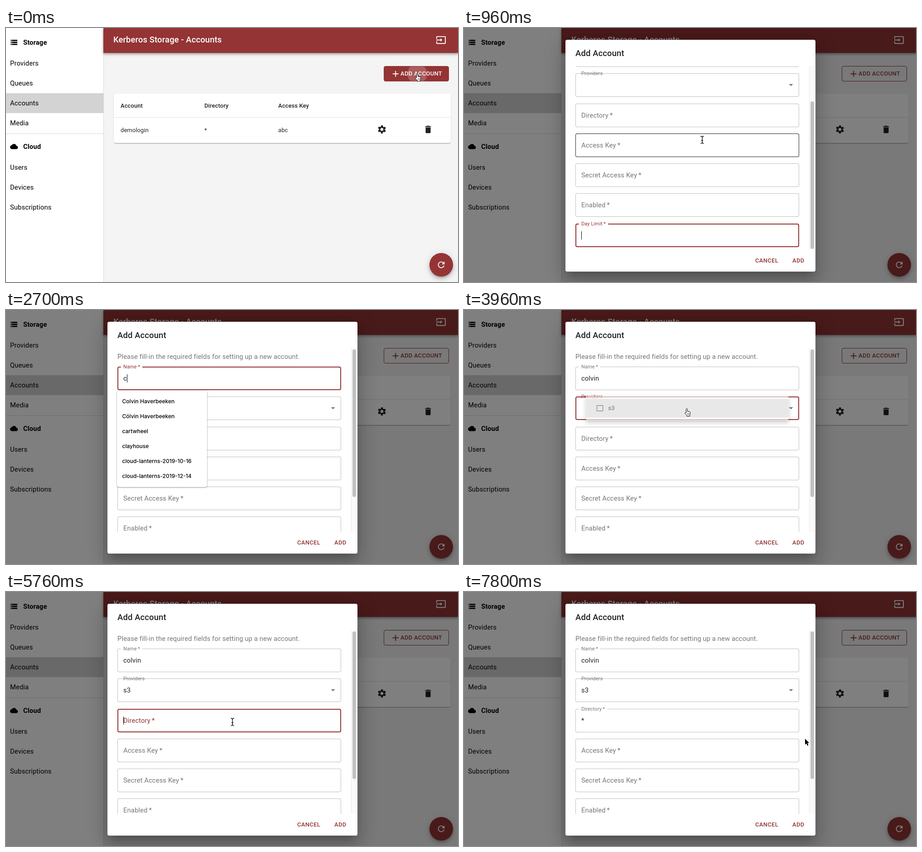
An HTML page that plays this animation: 998x561 px, repeating every 8 s.

```html
<!DOCTYPE html>
<html lang="en">
<head>
<meta charset="utf-8">
<title>Add Account</title>
<style>
  :root { --red: #943434; --ink: rgba(0,0,0,.87); --soft: rgba(0,0,0,.54); }
  html, body { margin: 0; width: 100%; height: 100%; overflow: hidden; }
  #stage { position: relative; width: 998px; height: 561px; overflow: hidden; background: #f4f4f4;
    font: 400 14.72px/20px Roboto, sans-serif; color: var(--ink); }
  #stage div, .t, .i { position: absolute; }
  .t { left: calc(var(--x) * 1px); top: calc(var(--y) * 1px - 10px); white-space: nowrap; letter-spacing: .009em; }
  .i { width: calc(var(--s) * 1px); height: calc(var(--s) * 1px); fill: currentColor;
    left: calc((var(--x) - var(--s) / 2) * 1px); top: calc((var(--y) - var(--s) / 2) * 1px); }
  .h6 { font-size: 18.4px; font-weight: 500; letter-spacing: .0075em; }
  .btn { font-size: 12.88px; font-weight: 500; letter-spacing: .02857em; }
  .cell { font-size: 12.88px; letter-spacing: .0107em; }
  .m { font-weight: 500; }
  .b { font-weight: 700; }
  .red { color: var(--red); }

  #side { left: 0; top: 0; width: 215px; height: 561px; background: #fff; border-right: 1px solid #dadada; color: #000; }
  #picked { top: 144px; width: 215px; height: 44px; background: #d3d3d3; }
  #rule { top: 233px; width: 215px; height: 1px; background: #d8d8d8; }
  #bar { left: 215px; top: 0; width: 783px; height: 55px; background: var(--red);
    box-shadow: 0 2px 4px rgba(0,0,0,.2), 0 4px 5px rgba(0,0,0,.14), 0 1px 9px rgba(0,0,0,.12); }
  #card { left: 238px; top: 145px; width: 744px; height: 109px; border-radius: 4px; background: #fff;
    box-shadow: 0 2px 1px -1px rgba(0,0,0,.2), 0 1px 1px rgba(0,0,0,.14), 0 1px 3px rgba(0,0,0,.12); }
  #card div { top: 52px; width: 744px; height: 1px; background: #e0e0e0; }
  #add { left: 834px; top: 84px; width: 144px; height: 34px; border-radius: 4px; overflow: hidden;
    box-sizing: border-box; border: 1px solid var(--red); }
  #ripple { left: 51px; top: -6px; width: 44px; height: 44px; border-radius: 50%; background: rgba(255,255,255,.2); }
  #fab { left: 935px; top: 497px; width: 51.5px; height: 51.5px; border-radius: 50%; background: var(--red);
    box-shadow: 0 3px 5px -1px rgba(0,0,0,.2), 0 6px 10px rgba(0,0,0,.14), 0 1px 18px rgba(0,0,0,.12); }

  #shade, #modal { inset: 0; }
  #shade { background: rgba(0,0,0,.5); }
  #paper { left: 224px; top: 26px; width: 551.5px; height: 512px; border-radius: 4px; background: #fff;
    box-shadow: 0 11px 15px -7px rgba(0,0,0,.2), 0 24px 38px 3px rgba(0,0,0,.14), 0 9px 46px 8px rgba(0,0,0,.12); }
  #view { left: 224px; top: 84px; width: 551px; height: 406px; overflow: hidden; }
  #form { left: -224px; top: -84px; }
  #track { left: 762px; top: 84px; width: 13px; height: 406px; box-sizing: border-box;
    background: #fafafa; border-left: 1px solid #e8e8e8; }
  #thumb { left: 765px; top: 87px; width: 8px; height: 326px; border-radius: 4px; }

  .field { left: 246px; width: 494px; height: 52px; border-radius: 4px; }
  .label { position: absolute; left: 6px; top: -9px; padding: 0 7px; line-height: 18px; white-space: nowrap;
    background: #fff; transform-origin: 7px 50%; letter-spacing: .009em; }
  .value { position: absolute; left: 13px; top: 17px; line-height: 18px; white-space: nowrap; letter-spacing: .009em; }
  .caret { display: inline-block; width: 1px; height: 18px; background: #000; vertical-align: top; }
  #menu { left: 246px; top: 185px; width: 494px; height: 64px; border-radius: 4px; background: #fff;
    box-shadow: 0 5px 5px -3px rgba(0,0,0,.2), 0 8px 10px 1px rgba(0,0,0,.14), 0 3px 14px 2px rgba(0,0,0,.12); }
  #menu div { top: 7px; width: 494px; height: 50px; background: #dbdbdb; }
  #list { left: 245px; width: 199px; padding: 7px 0 8px; border-radius: 4px; background: #fff; color: #000;
    box-shadow: 0 0 1px rgba(0,0,0,.4), 0 1px 3px rgba(0,0,0,.4); font: 500 12px/33px Inter, sans-serif; }
  #list p { margin: 0 0 0 11.5px; white-space: nowrap; }
  #pointer { position: absolute; left: 0; top: 0; overflow: visible; width: 1px; height: 1px; }
</style>
</head>
<body>
<div id="stage">
  <div id="side">
    <div id="picked"></div>
    <div id="rule"></div>
    <svg class="i" viewBox="0 0 24 24" style="--x:17.3;--y:31.5;--s:17.5"><path d="M2 20h20v-4H2zm2-3h2v2H4zM2 4v4h20V4zm4 3H4V5h2zm-4 7h20v-4H2zm2-3h2v2H4z"/></svg>
    <span class="t b" style="--x:38;--y:32">Storage</span>
    <svg class="i" viewBox="0 0 24 24" style="--x:17.5;--y:261.5;--s:17.4"><path d="M19.35 10.04C18.67 6.59 15.64 4 12 4 9.11 4 6.6 5.64 5.35 8.04 2.34 8.36 0 10.91 0 14c0 3.31 2.69 6 6 6h13c2.76 0 5-2.24 5-5 0-2.64-2.05-4.78-4.65-4.96z"/></svg>
    <span class="t b" style="--x:38;--y:262">Cloud</span>
  </div>
  <div id="bar"></div>
  <span class="t h6" style="--x:237;--y:26;color:#fff">Kerberos Storage - Accounts</span>
  <svg class="i" viewBox="0 0 24 24" style="--x:960;--y:26;--s:23;color:#fff"><path d="M21 3H3c-1.1 0-2 .9-2 2v4h2V5h18v14H3v-4H1v4c0 1.1.9 2 2 2h18c1.1 0 2-.9 2-2V5c0-1.1-.9-2-2-2zM11 16l4-4-4-4v3H1v2h10z"/></svg>
  <div id="add"><div id="ripple"></div></div>
  <div id="addText">
    <svg class="i" viewBox="0 0 24 24" style="--x:860;--y:101;--s:22.5"><path d="M19 13h-6v6h-2v-6H5v-2h6V5h2v6h6z"/></svg>
    <span class="t btn" style="--x:871;--y:101">ADD ACCOUNT</span>
  </div>
  <div id="card"><div></div></div>
  <svg class="i" viewBox="0 0 24 24" style="--x:829.5;--y:223.5;--s:22">
    <g fill="none" stroke="currentColor"><circle cx="12" cy="12" r="5.4" stroke-width="3.8"/>
    <circle cx="12" cy="12" r="8.3" stroke-width="3.2" stroke-dasharray="4.6 4.09" stroke-dashoffset="-2.05"/></g></svg>
  <svg class="i" viewBox="0 0 24 24" style="--x:932;--y:223.5;--s:22"><path d="M6 19c0 1.1.9 2 2 2h8c1.1 0 2-.9 2-2V7H6zM19 4h-3.5l-1-1h-5l-1 1H5v2h14z"/></svg>
  <div id="fab"></div>
  <svg class="i" viewBox="0 0 24 24" style="--x:960.5;--y:523;--s:22;color:#fff"><path d="M17.65 6.35C16.2 4.9 14.21 4 12 4c-4.42 0-8 3.58-8 8s3.58 8 8 8c3.73 0 6.84-2.55 7.73-6h-2.08c-.82 2.33-3.04 4-5.65 4-3.31 0-6-2.69-6-6s2.69-6 6-6c1.66 0 3.14.69 4.22 1.78L13 11h7V4z"/></svg>

  <div id="shade"></div>
  <div id="modal">
    <div id="paper"></div>
    <span class="t h6" style="--x:246;--y:55.5">Add Account</span>
    <div id="track"></div>
    <div id="thumb"></div>
    <div id="view"><div id="form">
      <span class="t" style="--x:246;--y:103;color:var(--soft)">Please fill-in the required fields for setting up a new account.</span>
    </div></div>
    <span class="t btn red" style="--x:643;--y:514">CANCEL</span>
    <span class="t btn red" style="--x:725;--y:514">ADD</span>
  </div>
  <div id="menu">
    <div></div>
    <svg class="i red" id="checked" viewBox="0 0 24 24" style="--x:34;--y:32;--s:22"><path d="M19 3H5c-1.1 0-2 .9-2 2v14c0 1.1.9 2 2 2h14c1.1 0 2-.9 2-2V5c0-1.1-.9-2-2-2z"/><path d="M5.7 12.1l4.3 4.2 8.3-8.3" fill="none" stroke="#fff" stroke-width="2"/></svg>
    <svg class="i" id="unchecked" viewBox="0 0 24 24" style="--x:34;--y:32;--s:22;color:var(--soft)"><rect x="4" y="4" width="16" height="16" rx="1" fill="none" stroke="currentColor" stroke-width="2"/></svg>
    <span class="t" style="--x:54;--y:32">s3</span>
  </div>
  <div id="list"></div>
  <svg id="pointer">
    <path id="arrow" d="M0 0V13.2L3 10.4 5.2 15.4 7.5 14.4 5.3 9.6H9.4Z" stroke="#fff" paint-order="stroke" stroke-width="1.6"/>
    <g id="hand" transform="translate(-4.5 0)" stroke="#000">
      <path d="M3 9V1.5a1.5 1.5 0 0 1 3 0V6l4.5.8q1.8.4 1.5 2.3l-.8 4.4v3H4.5v-1.7L.6 10.4q-.8-1.2.2-1.9t2.2.5z" fill="#fff"/>
      <path d="M6.5 10v3.5M8.8 10v3.5" stroke-width=".8"/></g>
    <g id="beam" fill="none"></g>
  </svg>
</div>
<script>
const LOOP = 8000, TICK = 60;
const $ = id => document.getElementById(id);
const clamp = v => Math.max(0, Math.min(1, v));
const smooth = v => v * v * (3 - 2 * v);
const ramp = (t, from, length) => smooth(clamp((t - from) / length));
const easeOut = (t, from, length = 200) => 1 - (1 - clamp((t - from) / length)) ** 3;

// Last value whose start time has passed.
const at = (t, steps) => steps.reduce((v, [start, next]) => t >= start ? next : v, steps[0][1]);

// Eased position along timed points [time, x, y].
function along(t, points) {
  let i = 0;
  while (i < points.length - 2 && t >= points[i + 1][0]) i++;
  const [a, b] = [points[i], points[i + 1]];
  const u = ramp(t, a[0], b[0] - a[0]);
  return [a[1] + (b[1] - a[1]) * u, a[2] + (b[2] - a[2]) * u];
}

function text(parent, str, x, y, cls = '') {
  const el = document.createElement('span');
  el.className = 't ' + cls;
  el.style.cssText = `--x:${x};--y:${y}`;
  el.textContent = str;
  parent.append(el);
}

['Providers', 'Queues', 'Accounts', 'Media'].forEach((s, i) => text($('side'), s, 9, 78 + 44 * i));
['Users', 'Devices', 'Subscriptions'].forEach((s, i) => text($('side'), s, 9, 308 + 44 * i));
[['Account', 'demologin', 15], ['Directory', '*', 200], ['Access Key', 'abc', 363]].forEach(([head, cell, x]) => {
  text($('card'), head, x, 26.5, 'cell m');
  text($('card'), cell, x, 80.5, 'cell');
});
const beamPath = 'M-3.5-8Q0-8 0-5V5Q0 8-3.5 8M3.5-8Q0-8 0-5M3.5 8Q0 8 0 5M-2 1.5H2';
$('beam').innerHTML = `<path d="${beamPath}" stroke="#fff" stroke-width="2.6"/><path d="${beamPath}" stroke="#000" stroke-width="1.3"/>`;

const NAME = 0, PROVIDERS = 1, DIRECTORY = 2, ACCESS = 3, LIMIT = 6, NONE = -1;
const fields = ['Name', 'Providers', 'Directory', 'Access Key', 'Secret Access Key', 'Enabled', 'Day Limit'].map((name, i) => {
  const box = document.createElement('div');
  box.className = 'field';
  box.style.top = Math.round(125 + 66.25 * i) + 'px';
  const star = i === PROVIDERS ? '' : '\u2009*';
  box.innerHTML = `<span class="label">${name}${star}</span><span class="value"><span></span><i class="caret"></i></span>`;
  if (i === PROVIDERS) {
    box.querySelector('.label').style.background = 'none';
    box.insertAdjacentHTML('beforeend', '<svg class="i" viewBox="0 0 24 24" style="--x:476;--y:26;--s:22;color:var(--soft)"><path d="M7 9.5l5 5 5-5z"/></svg>');
  }
  $('form').append(box);
  return { box, label: box.querySelector('.label'), value: box.querySelector('.value span'), caret: box.querySelector('.caret') };
});

const person = 'Colvin Haverbeeken';
const nameHints = [person, 'Cólvin Haverbeeken', 'cartwheel', 'clayhouse', 'cloud-lanterns-2019-10-16', 'cloud-lanterns-2019-12-14'];
const folderHints = ['*', 'media', 'archive', 'recordings', 'storage', 'backup'];

const focusSteps = [[0, LIMIT], [1920, NAME], [3840, PROVIDERS], [5760, DIRECTORY], [7560, NONE]];
const hoverSteps = [[0, NONE], [600, DIRECTORY], [720, NONE], [780, ACCESS], [1380, NONE], [1620, PROVIDERS],
  [1740, NONE], [1800, NAME], [3720, PROVIDERS], [5340, DIRECTORY], [7200, NONE]];
const typedSteps = [[0, 0], [2640, 1], [2880, 2], [3060, 3], [3180, 4], [3240, 5], [3360, 6]];
const hintSteps = [[0, []], [2220, nameHints], [2880, [person]], [3600, []], [6000, folderHints], [6660, []]];
const caretSteps = [[0, true], [2460, false], [2640, true], [6300, false], [6600, true]];
const pointerSteps = [[0, 'hand'], [60, 'arrow'], [600, 'beam'], [720, 'arrow'], [780, 'beam'], [1380, 'arrow'],
  [1620, 'hand'], [1740, 'arrow'], [1800, 'beam'], [2700, ''], [3600, 'beam'], [3720, 'hand'], [4920, 'arrow'],
  [5340, 'beam'], [6660, ''], [7020, 'beam'], [7200, 'arrow']];
const route = [[300, 908, 101], [840, 526, 247], [1560, 526, 247], [1860, 522, 152], [3560, 522, 152], [3840, 492, 218],
  [4260, 492, 218], [4860, 490, 232], [4980, 497, 262], [5040, 498, 289], [5100, 499, 291], [5460, 499, 291],
  [5700, 500, 287], [7000, 500, 287], [7260, 797, 330], [7560, 753, 324]];

function drawFields(t) {
  const focus = at(t, focusSteps), hover = at(t, hoverSteps), caretOn = at(t, caretSteps);
  const values = { [NAME]: 'colvin'.slice(0, at(t, typedSteps)),
    [PROVIDERS]: t >= 4380 ? 's3' : '', [DIRECTORY]: t >= 6600 ? '*' : '' };
  const shrink = { [NAME]: easeOut(t, 1920), [PROVIDERS]: 1, [DIRECTORY]: easeOut(t, 5760),
    [LIMIT]: easeOut(t, 45) - easeOut(t, 1920) };
  fields.forEach(({ box, label, value, caret }, i) => {
    const on = i === focus, s = shrink[i] || 0;
    const edge = on ? '2px var(--red)' : i === hover ? '1px var(--ink)' : '1px rgba(0,0,0,.25)';
    box.style.boxShadow = 'inset 0 0 0 ' + edge;
    label.style.color = on ? 'var(--red)' : 'var(--soft)';
    label.style.transform = `translateY(${26 * (1 - s)}px) scale(${1 - .25 * s})`;
    value.textContent = values[i] || '';
    caret.style.visibility = on && i !== PROVIDERS && caretOn ? 'visible' : 'hidden';
  });
}

function drawHints(t) {
  const hints = at(t, hintSteps), list = $('list');
  list.style.display = hints.length ? 'block' : 'none';
  list.style.top = (t < 5000 ? 178 : 311) + 'px';
  list.innerHTML = hints.map(h => `<p>${h}</p>`).join('');
}

function drawMenu(t) {
  const open = ramp(t, 3820, 240), shown = open - ramp(t, 5230, 200);
  $('menu').style.opacity = shown;
  $('menu').style.transform = `scale(${.75 + .25 * open}, ${.56 + .44 * open})`;
  $('checked').style.display = t >= 4380 ? '' : 'none';
  $('unchecked').style.display = t >= 4380 ? 'none' : '';
}

function render(t) {
  const shown = ramp(t, 20, 190);
  $('shade').style.opacity = $('modal').style.opacity = t ? shown : 0;
  $('add').style.backgroundColor = `rgba(148,52,52,${t ? 1 - ramp(t, 30, 200) : 1})`;
  $('addText').style.color = t < 60 ? '#fff' : 'var(--red)';
  $('ripple').style.opacity = at(t, [[0, 1], [60, .5], [120, 0]]);

  const scroll = 91 * (1 - clamp((t - 960) / 120));
  $('form').style.transform = `translateY(${-scroll}px)`;
  $('thumb').style.transform = `translateY(${scroll * 75 / 91}px)`;

  const [x, y] = along(t, route), kind = at(t, pointerSteps);
  $('pointer').style.transform = `translate(${x}px, ${y}px)`;
  for (const k of ['arrow', 'hand', 'beam']) $(k).style.display = k === kind ? '' : 'none';
  $('thumb').style.background = kind === 'arrow' && t > 7000 && x > 762 && x < 776 ? '#7d7d7d' : '#c1c1c1';

  drawFields(t);
  drawHints(t);
  drawMenu(t);
}

const start = performance.now();
let last = -1;
function loop() {
  const now = (performance.now() - start) % LOOP;
  const t = Math.min(7800, Math.floor(now / TICK) * TICK);
  if (t !== last) render(last = t);
  requestAnimationFrame(loop);
}
loop();
</script>
</body>
</html>
```
